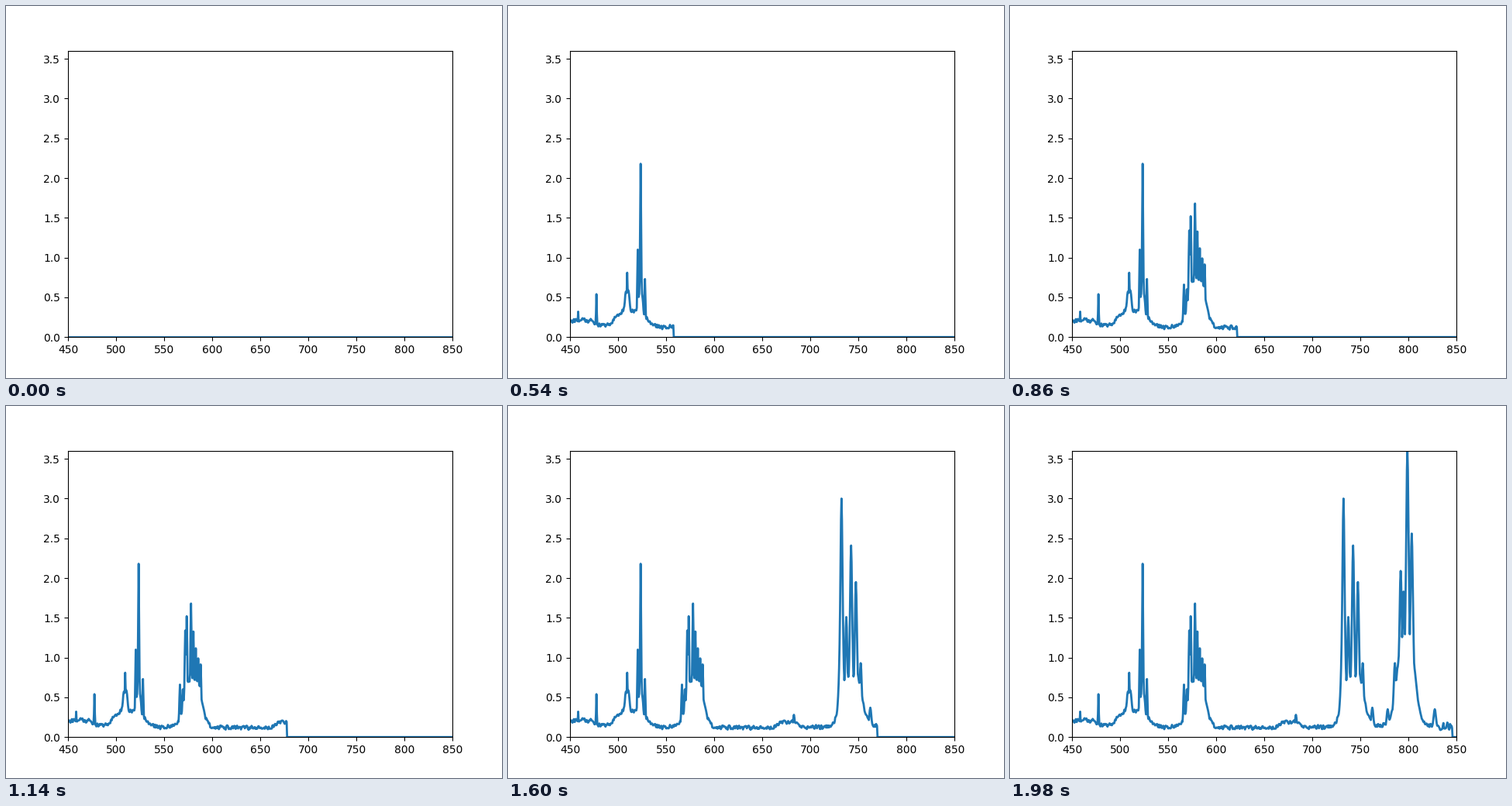
A matplotlib script for the animation above (2 s loop, 640 by 480 pixels).

```python
import numpy as np
import matplotlib.pyplot as plt
from matplotlib.animation import FuncAnimation

FRAMES = 100
X0, X1 = 450, 850
STEP = (X1 - X0) / FRAMES  # wavelength revealed per frame
TOP = 3.603
FLOOR = .12


def hump(x, centre, height, half):
    """Flat-topped swell with soft shoulders."""
    return height / (1 + abs((x - centre) / half) ** 5)


def peak(x, centre, height):
    """Lorentz line, broader towards long wavelengths."""
    width = (centre - 350) / 240
    return height / (1 + ((x - centre) / width) ** 2)


def series(start, step, heights):
    """Peaks at even spacing."""
    return [(start + step * k, h) for k, h in enumerate(heights)]


# centre, height, half width
HUMPS = [(463, .09, 15), (513, .2, 17), (509.5, .25, 2.5), (523.5, .28, 2.5),
         (580, .6, 10), (676, .07, 10), (743, .65, 12), (797.5, 1, 11)]

# centre, height
PEAKS = [
    (458.5, .32), (477.5, .54),
    (509.5, .81), (520.5, 1.1), (523.5, 2.18), (528, .73),
    (566.5, .66), (569.5, .6), (572, 1.34), (573.5, 1.52),
    *series(578, 2.5, .8 + .88 * .6 ** np.arange(5)),
    (683, .28),
    *series(732.5, 5, [3, 1.51, 2.41, 1.95, .93]),
    (762.5, .37), (778.5, .35),
    (786, .93), (792, 2.09), (795, 1.83), (799, TOP), (803.5, 2.56),
    (827.5, .35),
]


def spectrum(x):
    rng = np.random.default_rng(7)
    knots = np.arange(X0, X1 + 1, .8)
    noise = np.interp(x, knots, rng.uniform(-1, 1, knots.size))
    noise *= .03 + .04 * np.clip((x - 810) / 30, 0, 1)
    base = FLOOR + noise + sum(hump(x, *h) for h in HUMPS)
    return np.maximum.reduce([base] + [peak(x, *p) for p in PEAKS])


x = np.linspace(X0, X1, 2 * (X1 - X0) + 1)
y = spectrum(x)

fig, ax = plt.subplots(figsize=(6.4, 4.8), dpi=100)
ax.set_xlim(X0, X1)
ax.set_ylim(0, TOP)
line, = ax.plot(x, np.zeros_like(x), lw=2)


def update(i):
    line.set_ydata(np.where(x < X0 + STEP * i, y, 0))
    return line,


anim = FuncAnimation(fig, update, frames=FRAMES, interval=20,
                     repeat=True, repeat_delay=0)
plt.show()
```
